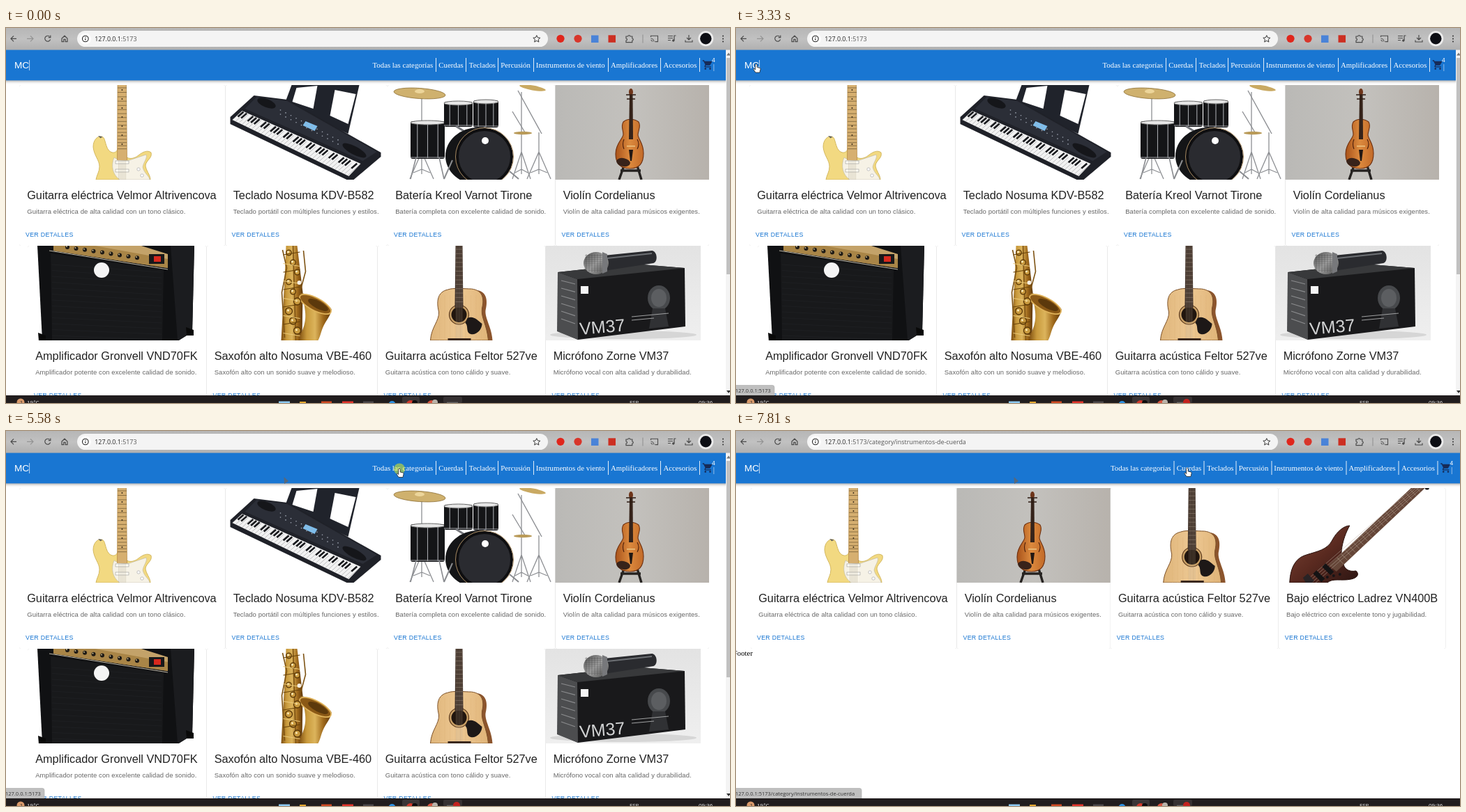
Write an HTML page that moves like this. It is 1038 px wide and 539 px high and loops after 8000 ms.

```html
<!DOCTYPE html>
<html lang="es">
<head>
<meta charset="utf-8">
<title>Tienda</title>
<style>
html, body { margin: 0; width: 100%; height: 100%; overflow: hidden; background: #fff; }
svg { display: block; }
text { white-space: pre; }
.sans { font-family: "Liberation Sans", Arial, sans-serif; }
.serif { font-family: "Liberation Serif", "Times New Roman", serif; }
.ui { font-family: "Open Sans", "Noto Sans", sans-serif; }
.card { filter: drop-shadow(0 .9px .6px rgba(0,0,0,.24)); }
.bar { filter: drop-shadow(0 1.4px 2px rgba(0,0,0,.42)); }
</style>
</head>
<body>
<svg id="stage" width="1038" height="539" viewBox="0 0 1038 539"></svg>
<script>
const LOOP = 8000;
const attrs = o => Object.entries(o).map(([k, v]) => ` ${k}="${v}"`).join('');
const rect = (x, y, w, h, fill, o = {}) => `<rect x="${x}" y="${y}" width="${w}" height="${h}" fill="${fill}"${attrs(o)}/>`;
const disc = (x, y, r, fill, o = {}) => `<circle cx="${x}" cy="${y}" r="${r}" fill="${fill}"${attrs(o)}/>`;
const oval = (x, y, rx, ry, fill, o = {}) => `<ellipse cx="${x}" cy="${y}" rx="${rx}" ry="${ry}" fill="${fill}"${attrs(o)}/>`;
const shape = (d, fill, o = {}) => `<path d="${d}" fill="${fill}"${attrs(o)}/>`;
const line = (d, stroke, w = 1, o = {}) => `<path d="${d}" fill="none" stroke="${stroke}" stroke-width="${w}"${attrs(o)}/>`;
const text = (x, y, s, size, fill, cls = 'sans', o = {}) =>
  `<text x="${x}" y="${y}" font-size="${size}" fill="${fill}" class="${cls}"${attrs(o)}>${s}</text>`;
const group = (id, body, o = {}) => `<g id="${id}"${attrs(o)}>${body}</g>`;
const times = (n, f) => Array.from({ length: n }, (_, i) => f(i)).join('');
const gradient = (id, stops, x2 = 1, y2 = 0) => `<linearGradient id="${id}" x2="${x2}" y2="${y2}">` +
  stops.map((c, i) => `<stop offset="${i / (stops.length - 1)}" stop-color="${c}"/>`).join('') + '</linearGradient>';

const defs = '<defs>' +
  gradient('metal', ['#b6b6b6', '#c1c1c1', '#b0b0b0'], 0, 1) +
  gradient('wall', ['#bab9b6', '#c3c1bd', '#b7b2ac']) +
  gradient('varnish', ['#a8521a', '#dc8a3e', '#c26a28']) +
  gradient('brass', ['#7b4c10', '#c99a3c', '#dcb45c', '#a06a1c', '#5f380a']) +
  gradient('spruce', ['#dfb57a', '#edc893', '#e0b478']) +
  gradient('burst', ['#7c4636', '#5a2a20', '#2c1512'], 1, 1) +
  gradient('studio', ['#e3e3e3', '#efefef'], 0, 1) +
  gradient('chrome', ['#4c4c4c', '#a5a5a5', '#484848'], 1, 1) +
  '</defs>';

// Product pictures: [left, top, markup]
function electricGuitar() {
  return [19, 82,
    shape('M137 156C131 155 125 161 125 171C126 183 134 190 134 199C134 207 130 211 129 218H207C207 211 200 204 200 197C202 189 210 187 208 179C203 175 196 178 190 183C184 188 176 189 172 185V174H160C158 181 149 181 145 172C141 162 142 157 137 156Z', '#f2d981', { stroke: '#cfb155', 'stroke-width': .9 }) +
    shape('M155 186C160 190 170 191 177 190L201 182C203 187 197 193 196 200C198 209 205 212 206 218H163C153 211 150 198 155 186Z', '#f6f2e6', { stroke: '#bdb7a4', 'stroke-width': .6 }) +
    shape('M160 82H172.5L173.5 190H159.5Z', '#e0b570') +
    line('M160 82L159.5 190M172.5 82L173.5 190', '#a9803f', .7) +
    times(17, i => line(`M160 ${86 + i * 6.6 - i * i * .07}h13`, '#7d6034', .9)) +
    times(7, i => disc(166.4, 89 + i * 13, 1.1, '#3b2b18')) +
    times(2, i => rect(157, 191 + i * 12, 19, 4, '#fffdf4', { stroke: '#999', 'stroke-width': .6 })) +
    times(6, i => line(`M${161.5 + i * 2} 82V218`, '#9d8e70', .3)) +
    times(2, i => disc(190 + i * 5, 203 + i * 9, 2.2, '#fff', { stroke: '#aaa', 'stroke-width': .7 })) +
    line('M136 158l-2-2 4 1', '#555', 1.2)];
}

function keyboard() {
  return [315, 82,
    shape('M410 82H507L491 152L400 109Z', '#20232b') +
    shape('M417 86L447 83L441 116L411 106Z', '#fff') +
    shape('M472 89L502 95L491 138L465 126Z', '#fff') +
    shape('M322 128L356 97L404 103L538 179V185L499 218H489L322 138Z', '#1f2128') +
    shape('M360 99L404 105L532 178L512 191L343 116Z', '#2b2e37') +
    shape('M325 132L339 119L509 195L492 213Z', '#f2f2f2') +
    times(37, i => { const x = 325 + i * 4.6, y = 132 + i * 2.22; return line(`M${x} ${y}l14.5 -13`, '#8b8b8f', .5); }) +
    times(36, i => i % 7 === 2 || i % 7 === 6 ? '' : line(`M${333 + i * 4.65} ${127.5 + i * 2.12}l8 -7`, '#17181c', 2.6)) +
    shape('M430 134L447 141L443 148L426 140Z', '#7fbdea') +
    oval(374, 108, 14, 6, '#15161a', { transform: 'rotate(22 374 108)' }) +
    oval(500, 176, 19, 6, '#15161a', { transform: 'rotate(28 500 176)' }) +
    times(24, i => disc(394 + i % 12 * 7.5, 118 + i % 12 * 3.9 + (i > 11 ? 6 : 0), .8, '#a5abb8'))];
}

function drums() {
  const stand = (x, top, w) => line(`M${x} ${top}V210M${x} 178L${x - w} 217M${x} 178L${x + w} 217M${x} 203L${x - w * .7} 208M${x} 203L${x + w * .7} 208`, '#8d8f93', 1.3);
  const tom = (x, y, w, h) => rect(x, y, w, h, '#141517', { rx: 3 }) +
    oval(x + w / 2, y + 2, w / 2, 3, '#e6e6e6', { stroke: '#666', 'stroke-width': 1 }) +
    line(`M${x} ${y + h - 2}h${w}M${x + w * .2} ${y + 4}v${h - 5}M${x + w * .5} ${y + 4}v${h - 5}M${x + w * .8} ${y + 4}v${h - 5}`, '#a5a7ab', 1.1);
  return [547, 82,
    stand(596, 94, 17) + stand(739, 92, 13) + stand(764, 150, 17) +
    line('M734 90L768 152M726 120L744 150', '#8f9195', 1.4) +
    oval(593, 94, 37, 7.5, '#cfb16e', { stroke: '#8f7138', 'stroke-width': .8, transform: 'rotate(4 593 94)' }) +
    oval(593, 91, 7, 3, '#ecd59a') +
    oval(755, 86, 19, 3.5, '#c9a962', { transform: 'rotate(10 755 86)' }) +
    oval(741, 151, 13, 2.2, '#b99a58') +
    tom(580, 134, 49, 54) +
    line('M588 186L580 217M621 186L628 217', '#8a8c90', 1.6) +
    tom(628, 106, 41, 36) + tom(670, 104, 36, 39) +
    line('M645 141L664 153M688 142L676 152', '#77797e', 3) +
    oval(677, 184, 47, 41, '#141517') +
    disc(686, 185, 39, '#2a2b30', { stroke: '#0e0e10', 'stroke-width': 4 }) +
    disc(686, 185, 41.5, 'none', { stroke: '#a88a61', 'stroke-width': 1 }) +
    line('M640 190L628 217M722 206L735 217', '#8a8c90', 2) +
    disc(687, 162, 5, '#fff')];
}

function violin() {
  return [787.5, 82,
    rect(787, 82, 222, 136, 'url(#wall)') +
    line('M886 198L879 218M905 198L911 218M881 205H910', '#262321', 3.4) +
    shape('M885 135C890 130 901 130 907 135C911 142 906 147 906 154C907 160 914 166 914 180C914 195 907 202 895 202C882 202 874 196 874 181C874 166 884 160 885 153C885 146 881 142 885 135Z', 'url(#varnish)', { stroke: '#6d3010', 'stroke-width': 1.1 }) +
    shape('M894 96H898.5L899 160H893Z', '#35231a') +
    oval(896, 92, 3, 5, '#6d3419') +
    line('M889 96h14M890 102h12', '#2d1b12', 1.5) +
    line('M886 160q-3 7 0 14M905 160q4 7 0 14', '#4a1d0b', 1.1) +
    rect(890, 169, 12, 1.6, '#ecc17e') +
    shape('M893 175H899L897 191H895Z', '#211713') +
    oval(885, 193, 10, 6, '#38231a', { transform: 'rotate(12 885 193)' })];
}

function amp() {
  return [31, 313,
    shape('M45 313H270L267 437L248 449H52Z', '#101113') +
    shape('M236 313H270L267 437L246 449Z', '#1b1c1f') +
    shape('M64 324L226 348L224 449H66Z', '#18191b') +
    times(13, i => line(`M66 ${340 + i * 8.5}l157 ${11 - i * .4}`, '#222427', .6)) +
    shape('M68 313H194L232 325V345L68 320Z', '#c3a269') +
    shape('M68 313H128L232 332V345L68 320Z', '#a98547') +
    times(9, i => disc(88 + i * 12.5, 315 + i * 1.9, 3, '#1e1a15') + disc(87 + i * 12.5, 314 + i * 1.9, .9, '#e8d5a5')) +
    rect(205, 325, 22, 14, '#18181a') + rect(212, 328, 10, 8, '#d8281d') +
    line('M62 320L232 347', '#d5cdbb', .9) +
    disc(137, 348, 11, '#f4f4f4') +
    times(2, i => shape(`M${46 + i * 212} ${438 - i * 8}l11 4v8h-10z`, '#090909'))];
}

function sax() {
  return [288, 313,
    shape('M402 313H418L426 380L425 449H395L400 360Z', 'url(#brass)') +
    shape('M420 449C426 432 432 424 429 404C428 393 424 387 422 381C436 382 458 391 467 404C467 411 462 417 458 424C452 434 452 442 448 449Z', 'url(#brass)') +
    oval(444, 397, 25, 9, '#8b5916', { transform: 'rotate(28 444 397)', stroke: '#dfb25a', 'stroke-width': 1.8 }) +
    oval(448, 398, 16, 5.5, '#5c390c', { transform: 'rotate(28 448 398)' }) +
    line('M397 319L403 345L396 380L400 445M427 320L430 350L423 376M412 313L416 449', '#7d5212', 1.6) +
    times(9, i => disc(406 + i % 3 * 6, 323 + i * 14, i > 4 ? 5 : 3.8, '#c99a3e', { stroke: '#573507', 'stroke-width': 1.3 }) + disc(405 + i % 3 * 6, 322 + i * 14, 1.4, '#fff0c2')) +
    times(10, i => line(`M398 ${326 + i * 12.5}l24 ${i % 2 * 8 - 4}`, i % 2 ? '#eac878' : '#694309', 1.2)) +
    disc(421, 366, 3, '#f6efe2')];
}

function acousticGuitar() {
  return [533, 313,
    shape('M676 377C691 379 691 394 688 406C687 418 697 430 698 449H684L670 385Z', '#8c552d') +
    shape('M634 376C642 373 658 375 668 375C685 377 686 390 683 403C681 416 690 426 692 449H609C610 430 622 421 621 408C617 391 620 379 634 376Z', 'url(#spruce)', { stroke: '#7b5028', 'stroke-width': 1 }) +
    times(9, i => line(`M${622 + i * 7.5} 384V449`, '#dcb176', .35)) +
    disc(650, 412, 14, '#c9a066', { stroke: '#5c3a1d', 'stroke-width': 1.2 }) +
    disc(650, 412, 11, '#21160f') +
    shape('M662 417C671 413 676 420 683 425C683 434 674 442 667 440C659 438 664 428 659 424Z', '#1d1817') +
    shape('M645 313H655L656 402H644Z', '#3a2c25') +
    times(13, i => line(`M645 ${318 + i * 6.3}h10.5`, '#85776a', .6)) +
    times(6, i => line(`M${646 + i * 1.7} 313V449`, '#b6a68e', .3)) +
    rect(634, 446, 33, 3, '#3a281e')];
}

function microphone() {
  return [773.5, 313,
    rect(773, 313, 223, 136, 'url(#studio)') +
    oval(885, 441, 105, 6, '#d6d6d6') +
    shape('M791 351L900 339L973 345L974 429L820 448L792 436Z', '#19191b') +
    shape('M791 351L819 361L820 448L790 436Z', '#4c4d4f') +
    shape('M791 351L900 339L973 345L819 361Z', '#38393b') +
    times(6, i => line(`M796 ${363 + i * 11}l20 ${5 + i * .4}`, '#8a8b8d', 1.2)) +
    oval(936, 388, 16, 18, '#47494c') + oval(936, 388, 11, 13, '#5c5e61') +
    shape('M927 403L945 403L950 429L922 432Z', '#303134') +
    shape('M857 327L926 320C934 321 935 336 928 338L858 349Z', '#2a2b2f') +
    line('M862 331L926 324', '#6d7074', 2) +
    oval(846, 338, 18, 16, 'url(#chrome)') +
    times(8, i => line(`M${832 + i * 4} 325v26M830 ${327 + i * 3}h32`, '#444', .4)) +
    shape('M855 322L862 325L862 350L855 353Z', '#77787b') +
    rect(824, 371, 11, 11, '#f5f5f5') +
    text(823, 441, 'VM37', 25, '#d2d3d4', 'sans', { transform: 'rotate(-5 823 441)' }) +
    line('M897 415L950 410M897 420L929 417', '#a0a1a2', 1)];
}

function bass() {
  return [778, 82,
    shape('M880 136C872 136 861 145 855 157C848 171 833 173 818 178C804 182 795 194 794 218H848C856 211 867 216 882 213C892 211 894 205 889 201C879 203 871 198 871 189C865 179 869 156 880 136Z', 'url(#burst)', { stroke: '#28110d', 'stroke-width': 1 }) +
    shape('M850 193L968 82H988L861 202Z', '#654638') +
    times(20, i => line(`M${862 + i * 5.8} ${182 - i * 5.45}l9 9`, '#ad9a88', .6)) +
    times(4, i => line(`M${820 + i * 3.4} ${213 + i * 2}L${971 + i * 4} 82`, '#b9a89c', .5)) +
    rect(841, 195, 17, 7, '#151314', { transform: 'rotate(45 849 198)' }) +
    rect(828, 205, 17, 7, '#151314', { transform: 'rotate(45 836 208)' }) +
    shape('M813 211l7-6 9 10-3 3h-9z', '#292325') +
    times(3, i => disc(848 + i * 9, 210 - i * 2, 2, '#171416')) +
    oval(991, 82, 3, 2.5, '#151515')];
}

function card(x, y, w, title, info, art) {
  const [ax, ay, body] = art();
  return rect(x, y, w, 231, '#fff', { rx: 2.7, class: 'card' }) +
    `<svg x="${x}" y="${y}" width="${w}" height="136" viewBox="${ax} ${ay} ${w} 136">${body}</svg>` +
    text(x + 11.2, y + 164, title, 16.3, '#212121') +
    text(x + 11.2, y + 184.6, info, 9.46, '#666', 'sans', { 'letter-spacing': .1 }) +
    text(x + 9, y + 218.2, 'VER DETALLES', 8.8, '#1976d2', 'sans', { 'letter-spacing': .31 });
}

const electric = ['Guitarra eléctrica Velmor Altrivencova', 'Guitarra eléctrica de alta calidad con un tono clásico.', electricGuitar];
const fiddle = ['Violín Cordelianus', 'Violín de alta calidad para músicos exigentes.', violin];
const acoustic = ['Guitarra acústica Feltor 527ve', 'Guitarra acústica con tono cálido y suave.', acousticGuitar];

const allItems = card(19, 82, 295.5, ...electric) +
  card(314.5, 82, 232.5, 'Teclado Nosuma KDV-B582', 'Teclado portátil con múltiples funciones y estilos.', keyboard) +
  card(547, 82, 240.5, 'Batería Kreol Varnot Tirone', 'Batería completa con excelente calidad de sonido.', drums) +
  card(787.5, 82, 220.5, ...fiddle) +
  card(31, 313, 256.5, 'Amplificador Gronvell VND70FK', 'Amplificador potente con excelente calidad de sonido.', amp) +
  card(287.5, 313, 245, 'Saxofón alto Nosuma VBE-460', 'Saxofón alto con un sonido suave y melodioso.', sax) +
  card(532.5, 313, 241, ...acoustic) +
  card(773.5, 313, 222.5, 'Micrófono Zorne VM37', 'Micrófono vocal con alta calidad y durabilidad.', microphone);

const stringItems = card(21, 82, 295.5, ...electric) + card(316.5, 82, 220.5, ...fiddle) +
  card(536.7, 82, 241, ...acoustic) +
  card(777.8, 82, 239.7, 'Bajo eléctrico Ladrez VN400B', 'Bajo eléctrico con excelente tono y jugabilidad.', bass) +
  text(-4.2, 323, 'Footer', 10.8, '#000', 'serif');

const scrollbar = rect(1032, 31, 6, 497, '#f4f4f4') + rect(1033, 43, 5, 311, '#c1c1c1') +
  shape('M1033 39.5l3-4 3 4z', '#777') + shape('M1033 521l3 4 3-4z', '#333');

const links = [[525.5, 'Todas las categorías', 616.5], [620.3, 'Cuerdas', 659.5], [663.8, 'Teclados', 705.5], [709.3, 'Percusión', 756.5],
  [759.8, 'Instrumentos de viento', 863.5], [867, 'Amplificadores', 938.5], [942.4, 'Accesorios', 994.5]];
const cart = 'M7 18c-1.1 0-2 .9-2 2s.9 2 2 2 2-.9 2-2-.9-2-2-2zM1 2v2h2l3.6 7.6-1.4 2.4c-.1.3-.2.6-.2 1 0 1.1.9 2 2 2h12v-2H7.4l-.2-.4.9-1.6h7.5c.7 0 1.4-.4 1.7-1l3.6-6.5c.5-.7-.1-1.5-.9-1.5H5.2l-.9-2H1zm16 16c-1.1 0-2 .9-2 2s.9 2 2 2 2-.9 2-2-.9-2-2-2z';
const menu = links.map(([x, s, bar]) => text(x, 57.3, s, 10.8, '#fff', 'serif') + line(`M${bar} 43V63`, '#e3edf8', 1)).join('') +
  shape(cart, '#172b57', { transform: 'translate(998 45) scale(.676)' }) +
  text(1012, 48.6, '4', 8.5, '#fff') + line('M1014.8 52V62', '#9fc3ea', .9);

const ink = '#4b4b4b';
const chrome = rect(0, 0, 1038, 31.5, 'url(#metal)') +
  line('M15 15.3H7M11 11.3l-4 4 4 4', ink, 1.2) + line('M30 15.3h9M35 11.3l4 4-4 4', '#939393', 1.2) +
  line('M62.6 12.4a4 4 0 1 0 1 4M63.8 10.6v3h-3', ink, 1.2) +
  line('M80 15v4.6h2.8v-3.3h2.4v3.3H88V15l-4-3.8z', ink, 1.2) +
  rect(102, 4, 675, 23, '#f4f4f4', { rx: 11.5 }) +
  disc(113.8, 15.5, 8.2, '#fff') + disc(113.8, 15.5, 4.3, 'none', { stroke: '#222', 'stroke-width': 1.1 }) +
  line('M113.8 15v2.6M113.8 13v1', '#222', 1.1) +
  `<text x="127.3" y="18.8" font-size="8.9" fill="#222" class="ui">127.0.0.1<tspan fill="#555">:5173<tspan id="path"></tspan></tspan></text>` +
  line('M760.8 10.6l1.5 3.2 3.5.4-2.6 2.4.7 3.5-3.1-1.8-3.1 1.8.7-3.5-2.6-2.4 3.5-.4z', '#333', 1) +
  disc(795, 15.3, 5.6, '#e0261c') + disc(820, 15.3, 5.6, '#d8362b') + rect(839, 10.5, 10.5, 10.5, '#4a83d8') + rect(863.5, 10.3, 10.5, 10.5, '#cc2f22') +
  line('M889 12h2.8a1.5 1.5 0 0 1 3 0h3v3a1.5 1.5 0 0 1 0 3v2.6H889v-2.6a1.5 1.5 0 0 0 0-3z', ink, 1.2) +
  line('M913 9.5v12', '#8d8d8d', 1) +
  line('M924.5 13v-1.8h10v8.4h-4M924.5 15a4.6 4.6 0 0 1 4.4 4.6M924.5 17.5a2 2 0 0 1 2 2', ink, 1.1) +
  line('M949 11.5h7M949 14.5h7M949 17.5h4M958 18v-7h2.5', ink, 1.2) + disc(956.8, 18, 1.7, ink) +
  line('M979 10v6.5M976 14l3 3 3-3M974 17.5v2.5h10v-2.5', ink, 1.2) +
  disc(1003.3, 15.3, 11, '#ececec') + disc(1003.3, 15.3, 8.2, '#0d0e14') +
  times(3, i => disc(1028, 11.5 + i * 4, 1, '#333'));

const taskbar = rect(0, 528, 1038, 11, '#211d1e') +
  disc(21, 538, 5.5, '#d99a6b') + text(19.8, 540.5, '1', 8, '#222', 'ui') + text(30, 541.3, '19°C', 8, '#eee', 'ui') +
  rect(391, 536.5, 16, 3, '#8cc8f0') + rect(421, 537, 9, 2, '#e5a72e') + rect(452, 536.5, 15, 3, '#cf4a22') +
  rect(482, 536.5, 16, 3, '#e2342b') + rect(512, 536.5, 15, 3, '#4b4749') + disc(553.5, 541, 5, '#2c8fe0') +
  rect(568, 530, 25, 9, '#3a3536', { rx: 2 }) + disc(580, 541, 6, '#d43a2c') + disc(586, 539, 4, '#0b0b0d') +
  disc(610, 541, 6, '#d8533f') + disc(615, 538, 4, '#b9b3a9') +
  rect(627, 530, 27, 9, '#363132', { rx: 2 }) + rect(632, 537.7, 16, 1.3, '#666') +
  group('record', disc(646, 538, 5, '#c3221f')) +
  text(894, 541, 'ESP', 7.8, '#eee', 'ui') + text(993, 541.2, '09:36', 8, '#eee', 'ui');

const arrow = shape('M0 0V9.4L2.2 7.4L3.7 10.8L5.2 10.1L3.8 6.9H6.8Z', '#fff', { stroke: '#222', 'stroke-width': .8 });
const hand = shape('M-1 0C0-.8 1.2-.2 1.2 1V4.5L5 5.4C6 5.8 6.2 6.4 6 7.4L5 12H-1L-4 7.6C-4.2 6.5-3 6.2-2.3 7L-1.4 8V.8Z', '#fff', { stroke: '#222', 'stroke-width': .8 });

document.getElementById('stage').innerHTML = defs + rect(0, 0, 1038, 539, '#fff') +
  group('all', allItems) + group('strings', stringItems) +
  rect(-4, 31, 1046, 44.3, '#1976d2', { class: 'bar' }) +
  text(12, 58.4, 'MC', 13.6, '#fff') + line('M33.6 46V61', '#d5e5f6', .9) +
  group('menu', menu) + group('smudge', shape('M398.5 66L405 72L399 76Z', '#56687c')) +
  group('scroll', scrollbar) + chrome +
  group('status', rect(-4, 513.5, 10, 18, '#bfbfbf', { id: 'bubble', rx: 3, stroke: '#aaa', 'stroke-width': .6 }) + text(-1, 523.6, '', 7.5, '#333', 'ui', { id: 'hint' })) +
  taskbar + disc(0, 0, 8, '#ff0', { id: 'click', opacity: .47 }) +
  group('pointer', group('arrow', arrow) + group('hand', hand));

// Pointer strokes: start, end, number of steps, waypoints
const strokes = [
  [530, 800, 5, [[650, 525], [760, 455], [885, 375], [1004, 322], [987, 318]]],
  [1020, 1760, 12, [[985, 319], [880, 328], [765, 329], [655, 324], [537, 314], [304, 260]]],
  [1830, 2600, 12, [[290, 250], [220, 190], [140, 125], [80, 85], [37, 62]]],
  [2670, 3470, 11, [[36, 61], [31, 56], [29, 52], [29, 52]]],
  [4000, 4770, 12, [[30, 53], [80, 62], [200, 72], [330, 68], [446, 64]]],
  [4830, 5040, 4, [[453.7, 63.5], [500, 60], [545, 57], [564, 54.5]]],
  [6640, 7200, 9, [[564.5, 54.5], [585, 57], [625, 58], [651, 56], [647, 53.5]]]
];

function pointerAt(t) {
  const stroke = strokes.filter(s => t >= s[0]).pop();
  if (!stroke) return null;
  const [start, end, n, pts] = stroke;
  const u = Math.min(1, Math.floor((t - start + 8) / (end - start) * (n - 1)) / (n - 1));
  const k = u * (pts.length - 1), i = Math.min(pts.length - 2, Math.floor(k));
  return pts[i].map((v, axis) => v + (pts[i + 1][axis] - v) * (k - i));
}

const byId = id => document.getElementById(id);
const show = (id, on) => byId(id).setAttribute('visibility', on ? 'visible' : 'hidden');
const within = (t, a, b) => t >= a && t < b;

function update(t) {
  const filtered = t >= 7810, longHint = t >= 7060;
  show('all', !filtered);
  show('strings', filtered);
  show('scroll', !filtered);
  byId('menu').setAttribute('transform', `translate(${filtered ? 11.5 : 0} 0)`);
  byId('path').textContent = t >= 7740 ? '/category/instrumentos-de-cuerda' : '';
  byId('record').setAttribute('opacity', Math.max(0, Math.min(1, Math.floor((t - 10) / 62) / 5)));
  show('smudge', t >= 4400);

  byId('status').setAttribute('opacity', within(t, 2940, 4250) || t >= 5310 ? 1 : t >= 5240 ? .7 : t >= 5040 ? .25 : 0);
  byId('hint').textContent = '127.0.0.1:5173' + (longHint ? '/category/instrumentos-de-cuerda' : '');
  byId('bubble').setAttribute('width', longHint ? 184 : 59);

  const at = pointerAt(t);
  show('pointer', at);
  const overLink = within(t, 2800, 4060) || t >= 4960;
  byId('arrow').style.display = overLink ? 'none' : '';
  byId('hand').style.display = overLink ? '' : 'none';
  show('click', within(t, 3470, 3600) || within(t, 5580, 5780) || within(t, 7600, 7740));
  if (at) for (const id of ['pointer', 'click']) byId(id).setAttribute('transform', `translate(${at})`);
}

const origin = performance.now();
function tick() {
  update((performance.now() - origin) % LOOP);
  requestAnimationFrame(tick);
}
tick();
</script>
</body>
</html>
```
